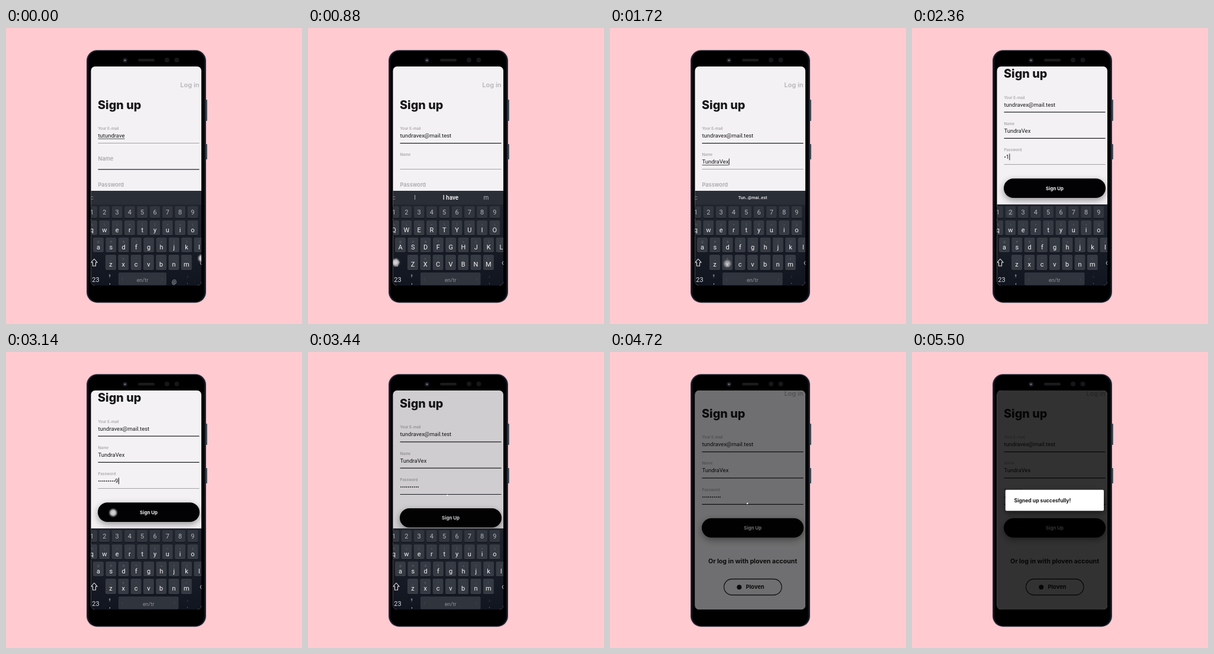
Recreate the animation shown at these times as an HTML page with a canvas. Size 500 by 500 pixels, loop 6480 ms.

```html
<!DOCTYPE html>
<html lang="en">
<head>
<meta charset="utf-8">
<title>Sign up</title>
<style>
html, body { margin: 0; width: 100%; height: 100%; overflow: hidden; background: #ffcad0; }
canvas { display: block; }
</style>
</head>
<body>
<canvas id="stage" width="500" height="500"></canvas>
<script>
const c = document.getElementById('stage').getContext('2d');
const LOOP = 6480;
const EMAIL = 'tundravex@mail.test', NAME = 'TundraVex', HINT = 'Tun..@mai..est';
const INK = '#17171a', GREY = '#aaa8ac';
const ROWS = [
  { keys: '123456789', x: 145, y: 301, h: 20 },
  { keys: 'qwertyuio', x: 145, y: 325, h: 25, sub: '%\\|=[]<>{' },
  { keys: 'asdfghjkl', x: 156, y: 354, h: 25, sub: '@#&*-+()/' },
  { keys: 'zxcvbnm', x: 177, y: 383, h: 26, sub: '_€"\':;!' }
];
const PITCH = 21.3;
const SHIFT = [148, 396], BACK = [331, 389];

const nameTimes = [930, 990, 1050, 1110, 1170, 1230, 1350, 1405, 1660];
const passKeys = '1123456789';
const passTimes = [...passKeys].map((_, i) => i < 8 ? 2200 + 80 * i : 2070 + 100 * i);

// Touches: [start, duration, [x, y]]
const taps = [
  [-100, 500, BACK], [415, 90, [241, 286]], [585, 100, [230, 226]],
  [860, 75, SHIFT], [1290, 60, SHIFT], [1830, 100, [230, 265]], [3090, 140, [181, 271.5]],
  ...nameTimes.map((t, i) => [t, 90, keyAt(NAME[i])]),
  ...passTimes.map((t, i) => [t, 75, keyAt(passKeys[i])])
];

function keyAt(ch) {
  const k = ch.toLowerCase();
  const row = ROWS.find(r => r.keys.includes(k));
  return [row.x + row.keys.indexOf(k) * PITCH, row.y + row.h / 2 + 2];
}

const ramp = (t, from, length) => {
  const p = Math.min(1, Math.max(0, (t - from) / length));
  return p * p * (3 - 2 * p);
};
const typed = (times, t) => times.filter(s => t >= s + 20).length;

function text(s, x, y, size, color, weight = 600, font = 'Inter', align = 'left') {
  c.font = `${weight} ${size}px ${font}, sans-serif`;
  c.fillStyle = color;
  c.textAlign = align;
  c.fillText(s, x, y);
}
const roboto = (s, x, y, size, color, weight = 400) => text(s, x, y, size, color, weight, 'Roboto', 'center');

function box(x, y, w, h, r, fill) {
  c.beginPath();
  c.roundRect(x, y, w, h, r);
  c.fillStyle = fill;
  c.fill();
}
function dot(x, y, r, fill) {
  c.beginPath();
  c.arc(x, y, r, 0, 7);
  c.fillStyle = fill;
  c.fill();
}
function stroke(points, color, width) {
  c.beginPath();
  points.forEach(p => c.lineTo(...p));
  c.strokeStyle = color;
  c.lineWidth = width;
  c.stroke();
}

function phone() {
  box(337, 121, 2.8, 36, 1, '#3c3f4c');
  box(337, 196, 2.8, 26, 1, '#3c3f4c');
  box(136, 37.2, 202, 427, 18, '#3d404c');
  box(137.2, 38.2, 199.6, 425, 17, '#10121b');
  box(139.5, 39, 195, 423.5, 16, '#000');
  dot(201, 54.5, 4, '#1b1c22');
  dot(201, 54.5, 1.6, '#6c6f78');
  box(223, 52, 28, 4.5, 2, '#1b1b1e');
  dot(272, 54, 4, '#17171a');
  dot(288.5, 54, 4, '#17171a');
}

function field(label, value, line, up, focused, caret, underline) {
  text(label, 155.5, line - 15 - 7.5 * up, 9.2 - 2.9 * up, GREY);
  text(value, 155.5, line - 9.4, 9.5, INK, 400, 'Roboto');
  const end = 155.5 + c.measureText(value).width;
  if (underline && value) box(155.5, line - 7.8, end - 155.5, 0.8, 0, INK);
  if (caret) box(end + 0.3, line - 18.4, 1, 11, 0, INK);
  box(155.5, line - 0.5, 171, focused ? 0.8 : 1.2, 0, focused ? '#8b898d' : '#202024');
}

function page(t) {
  box(143, 65, 188, 371, 0, '#f3f1f4');
  c.save();
  c.translate(0, -52.5 * ramp(t, 1950, 110) + 26.5 * ramp(t, 3400, 100));
  text('Log in', 326.5, 100, 11, '#b7b5b9', 600, 'Inter', 'right');
  text('Sign up', 155, 136.5, 19.8, INK, 800);

  const focus = t < 620 ? 0 : t < 1850 ? 1 : t < 3400 ? 2 : 3;
  const left = Math.max(0, 10 - Math.floor(Math.max(0, t - 140) / 25));
  const email = t < 450 ? 'tutundrave'.slice(0, left) : EMAIL;
  field('Your E-mail', email, 194.5, 1, focus === 0, false, t < 450);

  const name = NAME.slice(0, typed(nameTimes, t));
  field('Name', name, 238.8, ramp(t, 620, 70), focus === 1, focus === 1 && name, focus === 1);

  const n = typed(passTimes, t);
  const plain = n && t < 3260;
  const pass = '•'.repeat(plain ? n - 1 : n) + (plain ? passKeys[n - 1] : '');
  field('Password', pass, 283.2, ramp(t, 1850, 70), focus === 2, focus === 2 && n, false);

  c.save();
  c.shadowColor = 'rgba(0,0,0,.4)';
  c.shadowBlur = 12;
  c.shadowOffsetY = 4;
  box(155, 306.8, 172, 32.6, 16.3, '#020204');
  c.restore();
  text('Sign Up', 241, 326, 7.9, '#f3f1f4', 700, 'Inter', 'center');
  text('Or log in with ploven account', 241, 383, 10.6, INK, 700, 'Inter', 'center');
  c.beginPath();
  c.roundRect(192.5, 409.5, 97.5, 27, 13.5);
  c.strokeStyle = '#2a2a2e';
  c.lineWidth = 1.3;
  c.stroke();
  dot(218.3, 423.3, 4, INK);
  text('Ploven', 229.5, 426, 9.4, INK, 700);
  c.restore();
}

function keyboard(t) {
  const gone = Math.min(1, Math.max(0, (t - 3480) / 100));
  if (gone === 1) return;
  const upper = t >= 620 && t < 950 || t >= 1310 && t < 1370;
  const forEmail = t < 620;
  c.save();
  c.globalAlpha = (1 - gone) ** 3;
  c.translate(0, 60 * gone);

  const shade = c.createLinearGradient(0, 298, 0, 435);
  shade.addColorStop(0, '#20242d');
  shade.addColorStop(1, '#11151f');
  box(143, 298, 188, 138, 0, shade);
  if (t < 1920) {
    box(143, 275, 188, 23.5, 0, '#2a2e37');
    roboto('c', 145, 290, 10, '#858890');
    if (t >= 620 && t < 950) {
      roboto('I', 180.5, 290, 10, '#b9bbc0');
      roboto('I have', 241, 290, 10, '#fff', 500);
      roboto('m', 301, 290, 10, '#b9bbc0');
    } else if (t > 330) {
      roboto(HINT, 241, 289, 7.2, '#eee', 500);
    }
  }

  for (const { keys, x, y, h, sub } of ROWS) {
    [...keys].forEach((k, i) => {
      const kx = x + i * PITCH;
      box(kx - 9, y + 1, 18, h, 2.5, '#0d1017');
      box(kx - 9, y, 18, h, 2.5, sub ? '#363a43' : '#31353e');
      if (sub) {
        roboto(sub[i], kx, y + 8.5, 5.5, '#646870');
        roboto(upper ? k.toUpperCase() : k, kx, y + 20, 11, '#f4f4f5');
      } else {
        roboto(k, kx, y + 14, 11, '#b3b5ba');
      }
    });
  }

  // Shift arrow and the visible tip of backspace
  stroke([[149, 390], [154, 396], [151.5, 396], [151.5, 402], [146.5, 402], [146.5, 396], [144, 396], [149, 390]], '#e4e5e8', 1.1);
  stroke([[331, 392.5], [328, 397], [331, 401.5]], '#d5d6da', 1);

  // Bottom row: the space bar gives way to an @ key for e-mail
  const spaceEnd = forEmail ? 271 : 291.5;
  roboto('23', 151.5, 429, 11, '#dcdde0');
  box(190, 413, spaceEnd - 190, 21.5, 2, '#30343d');
  roboto('en/tr', (190 + spaceEnd) / 2, 428.5, 9, '#8f929a');
  stroke([[198, 422], [196, 424.5], [198, 427]], '#454952', 0.8);
  stroke([[spaceEnd - 8, 422], [spaceEnd - 6, 424.5], [spaceEnd - 8, 427]], '#454952', 0.8);
  box(174, 416, 2.4, 4, 1.2, '#6d7179');
  stroke([[175.2, 420], [175.2, 422]], '#6d7179', 0.8);
  roboto(',', 175.5, 432, 10, '#d5d6da');
  if (forEmail) roboto('@', 284, 432, 9, '#d5d6da');
  roboto('♪', 306.5, 422, 7, '#444851');
  roboto('.', 306.5, 432, 10, '#9a9ca2');
  c.restore();
}

function touches(t) {
  for (const [start, length, [x, y]] of taps) {
    const p = (t - start) / length;
    if (p < 0 || p > 1) continue;
    c.save();
    c.globalAlpha = Math.min(1, p * 6, (1 - p) * 2.2);
    const glow = c.createRadialGradient(x, y, 2, x, y, 8.5);
    glow.addColorStop(0, '#d2d2d5');
    glow.addColorStop(0.45, '#a9a9ad');
    glow.addColorStop(0.65, 'rgba(115,115,120,.6)');
    glow.addColorStop(1, 'rgba(110,110,116,0)');
    dot(x, y, 8.5, glow);
    c.restore();
  }
}

// cubic-bezier(.4, 0, .2, 1), solved by bisection
function fastOutSlowIn(p) {
  if (p <= 0 || p >= 1) return p <= 0 ? 0 : 1;
  let s = 0.5;
  for (let step = 0.25; step > 0.0005; step /= 2) {
    const x = 1.2 * s * (1 - s) ** 2 + 0.6 * s * s * (1 - s) + s ** 3;
    s += x < p ? step : -step;
  }
  return s * s * (3 - 2 * s);
}

function spinner(t) {
  const turn = Math.PI * 2, cycle = 416;
  const s = t - 4720 + 10 * cycle;
  const phase = (s % cycle) / cycle;
  const head = fastOutSlowIn(phase * 2), tail = fastOutSlowIn(phase * 2 - 1);
  const start = turn * (143 / 360 + (t - 4720) / 741 + 0.75 * tail + 0.25 * phase);
  c.beginPath();
  c.arc(241, 250.7, 10.3, start, start + Math.max(0.2, (head - tail) * 0.75 * turn));
  c.strokeStyle = '#fff';
  c.lineWidth = 2.4;
  c.stroke();
}

function dim(amount) {
  if (amount > 0) box(143, 65, 188, 371, 0, `rgba(0,0,0,${0.54 * amount})`);
}

function dialog(t) {
  const shown = ramp(t, 5040, 110);
  dim(shown);
  if (!shown) return;
  c.save();
  c.globalAlpha = shown;
  c.shadowColor = 'rgba(0,0,0,.5)';
  c.shadowBlur = 10;
  c.shadowOffsetY = 4;
  box(157.8, 232.8, 166.2, 35.4, 2, '#fff');
  c.shadowColor = 'transparent';
  text('Signed up succesfully!', 172.5, 254, 8.6, INK, 700);
  c.restore();
}

function draw(now) {
  const t = now % LOOP;
  c.fillStyle = '#ffcad0';
  c.fillRect(0, 0, 500, 500);
  phone();
  c.save();
  c.beginPath();
  c.roundRect(143.5, 65, 186.5, 370, 7);
  c.clip();
  page(t);
  dim(ramp(t, 3410, 90));
  if (t >= 3440 && t < 5000) spinner(t);
  keyboard(t);
  touches(t);
  dialog(t);
  c.restore();
}

const begin = performance.now();
function tick() {
  draw(performance.now() - begin);
  requestAnimationFrame(tick);
}
tick();
</script>
</body>
</html>
```
